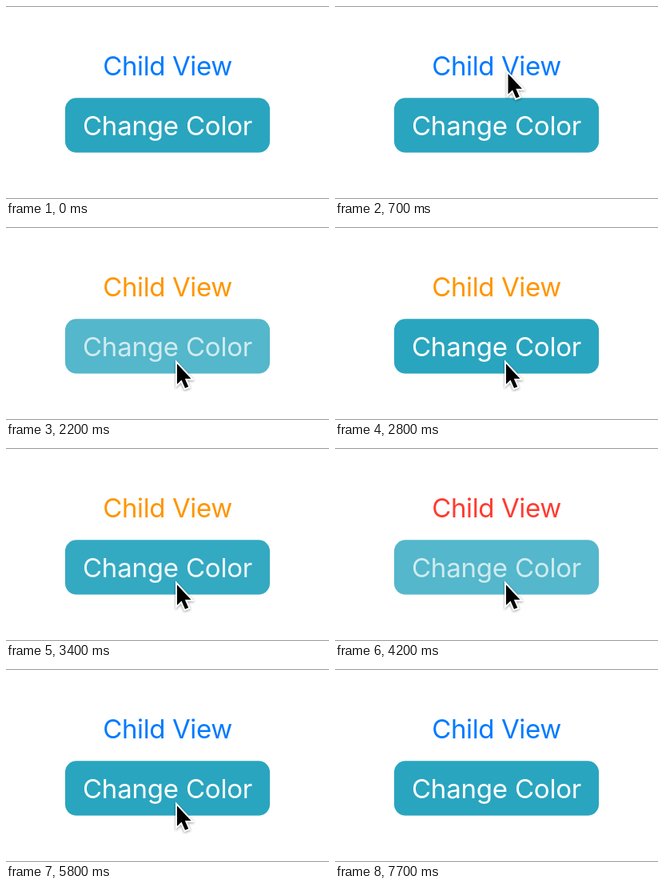
These frames come from a looping animation (404 by 242 pixels, 7.8 s). An HTML page:

```html
<!DOCTYPE html>
<html lang="en">
<head>
<meta charset="utf-8">
<title>Change Color</title>
<style>
  html, body { margin: 0; width: 100%; height: 100%; overflow: hidden; background: #fff; }
  svg { display: block; }
  text { font: 33px Inter, sans-serif; text-anchor: middle; }
  #arrow { filter: drop-shadow(0 1.5px 1.5px rgba(0, 0, 0, .4)); }
</style>
</head>
<body>
<svg width="404" height="242" viewBox="0 0 404 242">
  <rect width="404" height="242" fill="#fff"/>
  <path d="M0 .5H404M0 241.5H404" stroke="#999"/>
  <text id="title" x="202" y="87" letter-spacing="-.4">Child View</text>
  <rect id="button" x="74" y="115.3" width="256" height="68.5" rx="14" fill="#2aa5bf"/>
  <text id="label" x="202" y="162" letter-spacing="-.2" fill="#fff">Change Color</text>
  <g id="arrow">
    <path d="M0 0V25.5L5.5 20.3 10 30.5 14.2 28.8 9.8 18.8H17.5Z" stroke="#fff" stroke-width="4" paint-order="stroke"/>
  </g>
</svg>
<script>
const LOOP = 7800, STEP = 100, FADE = 600;
const BLUE = '#007aff', GREEN = '#34c759', ORANGE = '#ff9500', RED = '#ff3b30';
const clicks = [[1300, GREEN], [2200, ORANGE], [3200, ORANGE], [4200, RED], [5300, BLUE]];
// pointer positions: time, x, y
const path = [[0, 226, 250], [100, 226, 232], [600, 218, 74], [800, 215, 96],
  [1200, 214, 171.5], [6500, 214, 171.5], [6600, 216, 222], [6700, 217, 260], [LOOP, 217, 260]];

const [title, button, label, arrow] =
  ['title', 'button', 'label', 'arrow'].map(id => document.getElementById(id));

function pointerAt(t) {
  const i = path.findIndex(p => p[0] > t);
  const [t0, x0, y0] = path[i - 1], [t1, x1, y1] = path[i];
  const u = (t - t0) / (t1 - t0), e = u * u * (3 - 2 * u);
  return [x0 + (x1 - x0) * e, y0 + (y1 - y0) * e];
}

function draw(t) {
  const [start, color] = clicks.filter(c => c[0] <= t).pop() || [-FADE, BLUE];
  const dim = 0.2 * Math.max(0, 1 - (t - start) / FADE) ** 3.4;
  title.setAttribute('fill', color);
  button.setAttribute('opacity', 1 - dim);
  label.setAttribute('opacity', 1 - 1.4 * dim);
  arrow.setAttribute('transform', `translate(${pointerAt(t)})`);
  arrow.setAttribute('visibility', t >= 100 && t < 6700 ? 'visible' : 'hidden');
}

function frame() {
  draw(Math.floor(performance.now() % LOOP / STEP) * STEP);
  requestAnimationFrame(frame);
}
frame();
</script>
</body>
</html>
```
